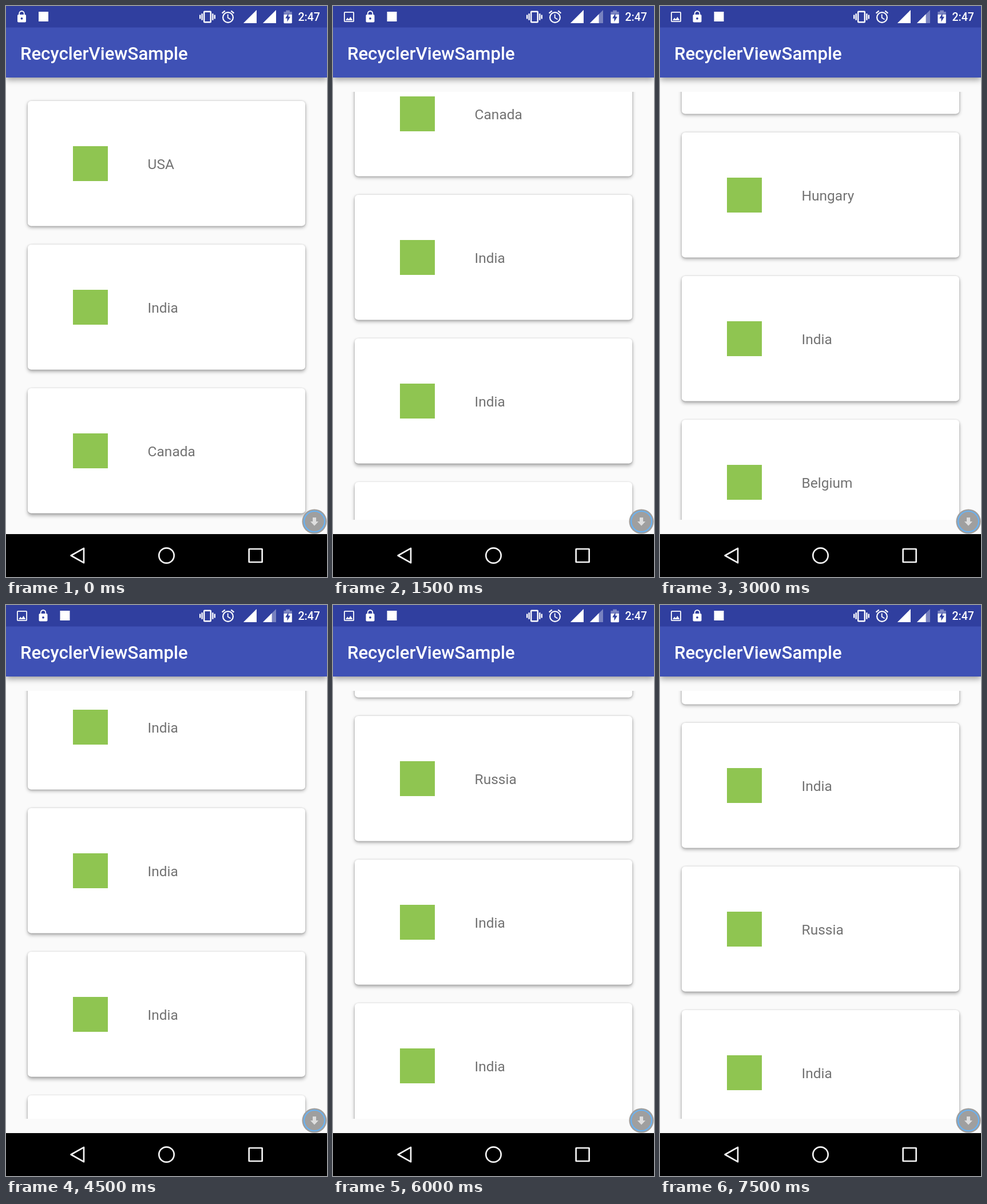
An HTML page with a canvas for the animation above (8000 ms loop, 561 px wide and 998 px high).

```html
<!DOCTYPE html>
<html lang="en">
<head>
<meta charset="utf-8">
<title>RecyclerViewSample</title>
<style>
  html, body { margin: 0; width: 100%; height: 100%; overflow: hidden; background: #fafafa; }
  canvas { display: block; width: 561px; height: 998px; }
</style>
</head>
<body>
<canvas id="stage" width="561" height="998"></canvas>
<script>
const ctx = document.getElementById('stage').getContext('2d');
const W = 561, H = 998;
const LOOP = 8000, HOLD = 1500;
const PITCH = 251;
const STATUS = '#303f9f', BAR = '#3f51b5';

// Scroll stops: top of the first card, then the card labels downwards.
const stops = [
  { top: 166, labels: ['USA', 'India', 'Canada'] },
  { top: 79, labels: ['Canada', 'India', 'India', ''] },
  { top: -30, labels: ['', 'Hungary', 'India', 'Belgium'] },
  { top: 104, labels: ['India', 'India', 'India', ''] },
  { top: -57, labels: ['', 'Russia', 'India', 'India'] },
  { top: -45, labels: ['', 'India', 'Russia', 'India'] }
];

function rect(x, y, w, h, fill) {
  ctx.fillStyle = fill;
  ctx.fillRect(x, y, w, h);
}

function round(x, y, w, h, r) {
  ctx.beginPath();
  ctx.roundRect(x, y, w, h, r);
}

function circle(x, y, r) {
  ctx.beginPath();
  ctx.arc(x, y, r, 0, Math.PI * 2);
}

function poly(points) {
  ctx.beginPath();
  points.forEach(([x, y]) => ctx.lineTo(x, y));
  ctx.closePath();
}

function line(...points) {
  ctx.beginPath();
  points.forEach(([x, y]) => ctx.lineTo(x, y));
  ctx.stroke();
}

function fill(color) {
  ctx.fillStyle = color;
  ctx.fill();
}

function stroke(color, width) {
  ctx.strokeStyle = color;
  ctx.lineWidth = width;
  ctx.stroke();
}

function shadow(color, blur, dy) {
  ctx.shadowColor = color;
  ctx.shadowBlur = blur;
  ctx.shadowOffsetY = dy;
}

function text(str, x, y, size, weight, color) {
  ctx.font = `${weight} ${size}px Roboto, sans-serif`;
  ctx.fillStyle = color;
  ctx.fillText(str, x, y);
}

function drawCard(top, label) {
  ctx.save();
  round(38, top, 485, 218.5, 6);
  // Shadows fall longer towards the bottom of the screen.
  shadow('rgba(0,0,0,.32)', 6, 2 + Math.max(0, top) / 300);
  fill('#fff');
  shadow('rgba(0,0,0,.22)', 3, 0.5);
  fill('#fff');
  ctx.restore();
  rect(117, top + 79, 61, 61, '#8fc551');
  text(label, 247.6, top + 119, 24.5, 400, '#737373');
}

function drawList({ top, labels }) {
  ctx.save();
  ctx.beginPath();
  ctx.rect(25, 150, 511, 748);
  ctx.clip();
  labels.forEach((label, i) => drawCard(top + i * PITCH, label));
  ctx.restore();
}

function drawToolbar() {
  ctx.save();
  shadow('rgba(0,0,0,.38)', 10, 4);
  rect(0, 0, W, 125, BAR);
  ctx.restore();
  rect(0, 0, W, 37.5, STATUS);
  text('RecyclerViewSample', 24.9, 94, 31.2, 500, '#fff');
}

function drawLock(x) {
  round(x - 7.5, 15, 15, 13.5, 1.8);
  fill('#fff');
  ctx.beginPath();
  ctx.moveTo(x - 4.3, 16);
  ctx.lineTo(x - 4.3, 13.3);
  ctx.arc(x, 13.3, 4.3, Math.PI, 0);
  ctx.lineTo(x + 4.3, 16);
  stroke('#fff', 1.8);
  circle(x, 21.8, 1.9);
  fill(STATUS);
}

function drawPicture() {
  round(19.9, 10.9, 16.2, 16.2, 1);
  stroke('#fff', 1.8);
  poly([[22, 25], [25.3, 20.5], [27.6, 23.2], [30.6, 19], [34.4, 25]]);
  fill('#fff');
}

function drawVibrate() {
  round(346.2, 9.7, 11.6, 18.6, 0.8);
  stroke('#fff', 2.4);
  for (const side of [-1, 1]) {
    rect(352 + side * 9.3 - 1.2, 13.2, 2.4, 11.6, '#fff');
    rect(352 + side * 12.8 - 1.2, 15.5, 2.4, 7, '#fff');
  }
}

function drawAlarm() {
  circle(388, 20, 8.9);
  stroke('#fff', 2.2);
  line([377.6, 12.6], [382.7, 8.4]);
  line([398.4, 12.6], [393.3, 8.4]);
  ctx.lineWidth = 1.8;
  line([387.7, 14.4], [387.7, 20.6], [392.5, 23.5]);
}

function drawSignal(x, level) {
  const y = 30, size = 23;
  poly([[x, y], [x + size, y - size], [x + size, y]]);
  fill('rgba(255,255,255,.35)');
  const w = size * level;
  poly([[x, y], [x + w, y - w], [x + w, y]]);
  fill('#fff');
}

function drawBattery() {
  rect(489.3, 7.5, 6.6, 3, 'rgba(255,255,255,.35)');
  rect(485.4, 10, 14.4, 5, 'rgba(255,255,255,.35)');
  round(485.4, 15, 14.4, 15.3, [0, 0, 1.5, 1.5]);
  fill('#fff');
  poly([[493.6, 12.8], [488.2, 21.5], [491.5, 21.5], [491.5, 27.6], [497, 18.8], [493.6, 18.8]]);
  fill(STATUS);
}

function drawStatus(index) {
  const saved = index > 0;
  const shift = saved ? 37.5 : 0;
  if (saved) drawPicture();
  drawLock(27.5 + shift);
  rect(57 + shift, 10, 17, 17, '#fff');
  drawVibrate();
  drawAlarm();
  drawSignal(415, 1);
  drawSignal(449, saved ? 0.68 : 1);
  drawBattery();
  text('2:47', 510.5, 26, 19.5, 500, '#fff');
}

function drawNav() {
  rect(0, 923, W, H - 923, '#000');
  ctx.lineJoin = 'round';
  poly([[113.6, 960.5], [136, 947.8], [136, 973.2]]);
  stroke('#f4f4f4', 2.7);
  circle(280.5, 960.5, 13.2);
  stroke('#f4f4f4', 2.7);
  round(424.7, 949, 23, 23, 0.5);
  stroke('#f4f4f4', 2.7);
  ctx.lineJoin = 'miter';
}

function drawFloat() {
  const x = 539, y = 901;
  circle(x, y, 21.6);
  fill('#9f9f9f');
  circle(x, y, 18);
  stroke('#68b2f3', 2.2);
  poly([
    [x - 3, y - 7], [x + 3, y - 7], [x + 3, y], [x + 7, y],
    [x, y + 7.5], [x - 7, y], [x - 3, y]
  ]);
  fill('#dedede');
}

function draw(now) {
  const index = Math.floor((now % LOOP) / HOLD);
  rect(0, 0, W, H, '#fafafa');
  drawList(stops[index]);
  drawToolbar();
  drawStatus(index);
  drawNav();
  drawFloat();
}

let start;
function tick(now) {
  start ??= now;
  draw(Math.max(0, now - start));
  requestAnimationFrame(tick);
}
draw(0);
requestAnimationFrame(tick);
</script>
</body>
</html>
```
